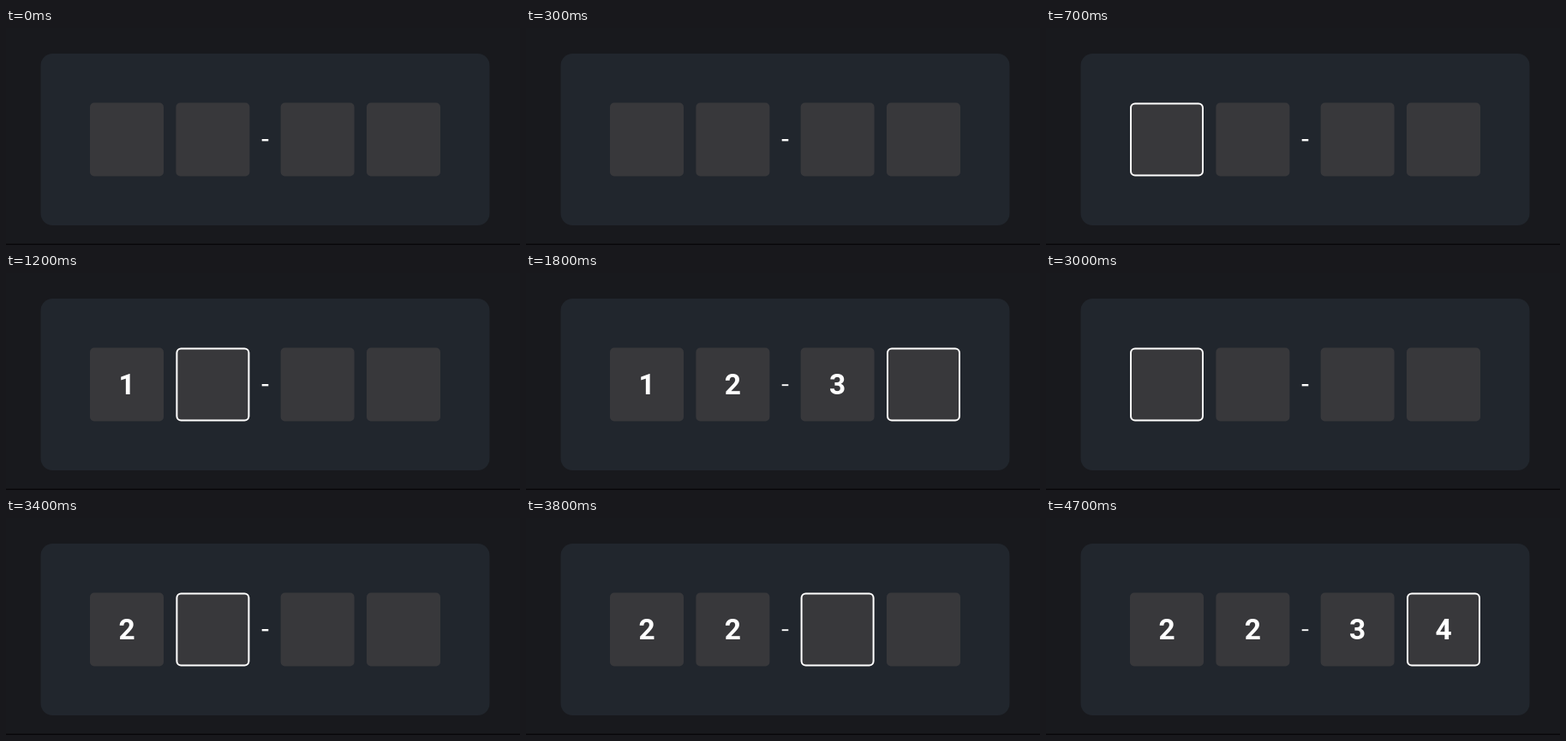
Write an HTML page that moves like this. It is 600x254 px and loops after 5.8 s.

```html
<!DOCTYPE html>
<html lang="en">
<head>
<meta charset="utf-8">
<title>Code input</title>
<style>
  html, body { margin: 0; width: 100%; height: 100%; overflow: hidden; background: #18191d; }
  svg { display: block; width: 600px; height: 254px; }
  text { font: 700 33.5px Roboto, sans-serif; fill: #fff; text-anchor: middle; }
  .cell { fill: #38383b; }
  .ring { fill: none; stroke: #fff; stroke-width: 2; }
</style>
</head>
<body>
<svg viewBox="0 0 600 254">
  <rect width="600" height="254" fill="#18191d"/>
  <rect y="252.5" width="600" height="1.5" fill="#08080a"/>
  <rect x="40.5" y="30" width="524" height="201" rx="14" fill="#21262d"/>
  <g id="cells"></g>
  <rect id="dash" x="298.7" width="7.6" fill="#fff"/>
</svg>
<script>
const LOOP = 5800;
const SIZE = 86;
const lefts = [98, 198.4, 320.6, 421];

// [start ms, typed digits, focused cell]
const steps = [
  [0, "", -1], [700, "", 0],
  [1200, "1", 1], [1500, "12", 2], [1800, "123", 3], [2100, "1234", 3],
  [2500, "123", 3], [2700, "12", 2], [2800, "1", 1], [3000, "", 0],
  [3400, "2", 1], [3800, "22", 2], [4100, "223", 3], [4300, "2234", 3]
];

const add = (name, attrs) => {
  const el = document.createElementNS("http://www.w3.org/2000/svg", name);
  for (const key in attrs) el.setAttribute(key, attrs[key]);
  return document.getElementById("cells").appendChild(el);
};

const cells = lefts.map(x => {
  add("rect", { class: "cell", x, y: 87.5, width: SIZE, height: SIZE, rx: 5 });
  return {
    ring: add("rect", { class: "ring", x: x + 1, y: 88.5, width: SIZE - 2, height: SIZE - 2, rx: 5 }),
    digit: add("text", { x: x + SIZE / 2, y: 142 })
  };
});
const dash = document.getElementById("dash");

function draw(now) {
  const time = now % LOOP;
  const [, typed, focus] = steps.findLast(step => step[0] <= time);
  cells.forEach(({ ring, digit }, i) => {
    ring.style.display = i === focus ? "" : "none";
    digit.textContent = typed[i] || "";
  });
  const height = focus < 2 ? 2.4 : 1.9;
  dash.setAttribute("height", height);
  dash.setAttribute("y", 131.2 - height / 2);
  requestAnimationFrame(draw);
}
draw(0);
</script>
</body>
</html>
```
